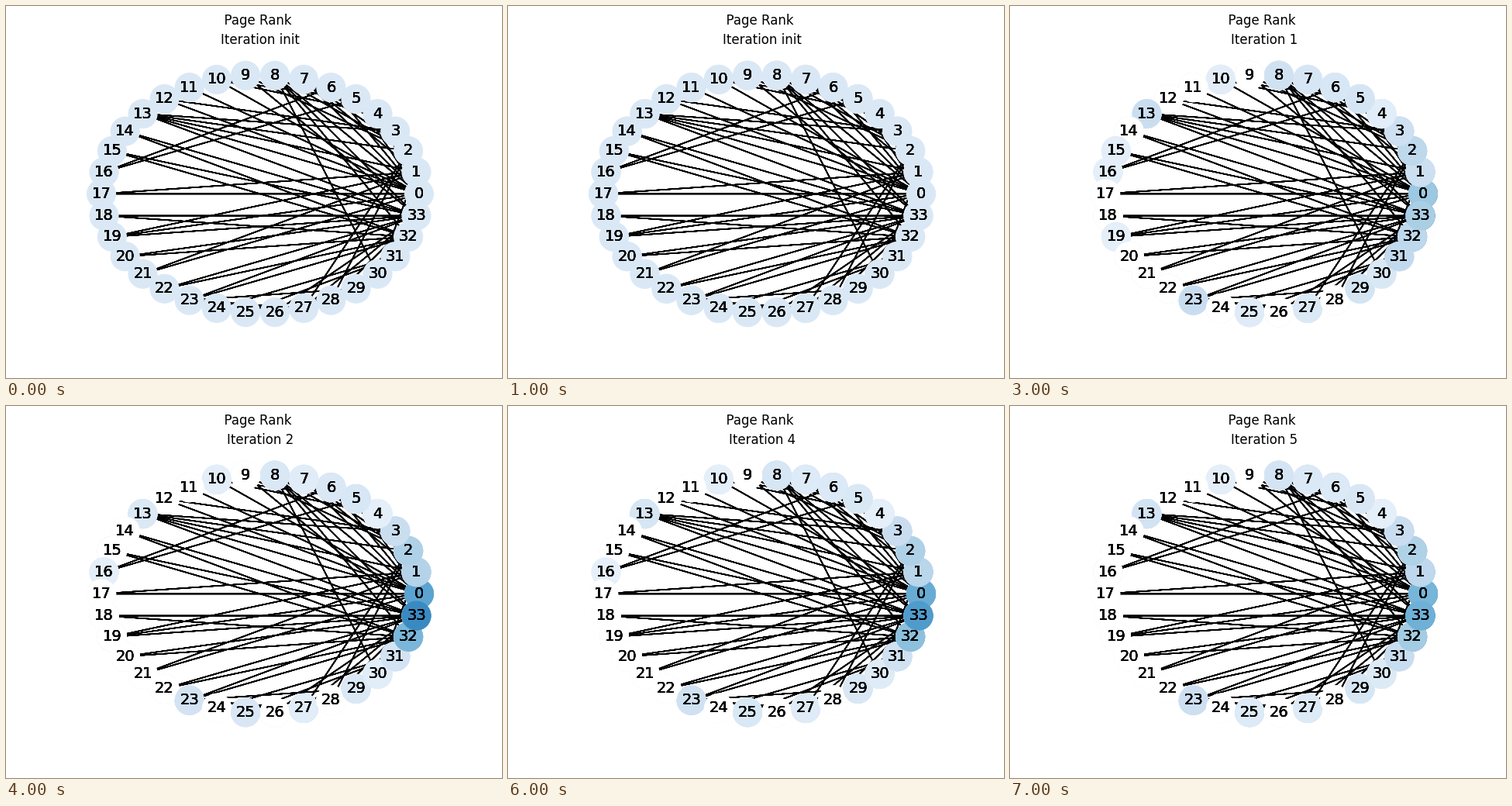
Recreate the animation shown at these times as a matplotlib script. Size 640x480 px, loop 8 s.

```python
from itertools import combinations, product

import matplotlib.pyplot as plt
import numpy as np
from matplotlib.animation import FuncAnimation
from matplotlib.collections import LineCollection

W, H = 640, 480
N = 34
FRAMES = 8
VMAX = 0.2
FAINT = 0.085  # paler shades than this show as white


def build_links():
    """Karate club ties, grouped into cliques and hub-to-member links."""
    links = np.zeros((N, N))

    def join(pairs, weight):
        for a, b in pairs:
            links[a, b] = links[b, a] = weight

    def hub(hubs, members, weight):
        join(product(hubs, members), weight)

    core, pair, rivals = range(4), (0, 1), (32, 33)
    join(combinations(core, 2), 4)
    join(combinations((5, 6, 16), 2), 3.4)
    hub(core, (7, 13), 3.3)
    hub(pair, (17, 19, 21), 2)
    hub([0], (4, 5, 6, 11), 3)
    hub([0], (8, 10, 12, 31), 2)
    hub(rivals, (14, 18, 20, 22), 2.3)
    hub(rivals, (8, 15, 30), 3.2)
    hub(rivals, (23, 29, 31), 4)
    hub([33], (9, 19, 26, 28), 2)
    hub([33], (13, 27, 32), 4)
    hub([2], (9, 27, 28, 32), 2)
    hub([8], (2, 30), 4)
    hub([10], (4, 5), 3)
    hub([23], (25, 27, 29), 4)
    hub([24], (25, 27, 31), 2.3)
    join([(1, 30), (4, 6), (28, 31)], 2)
    join([(3, 12), (26, 29)], 3.5)
    join([(25, 31)], 7)
    return links


def rank_history(links):
    """Rank vectors per frame: two starting states, then power iteration."""
    step = links / links.sum(axis=0)
    ranks = [np.full(N, 1 / N)] * 2
    while len(ranks) < FRAMES:
        ranks.append(step @ ranks[-1])
    return ranks


def shades(rank):
    level = rank / VMAX
    colors = plt.cm.Blues(level)
    colors[level < FAINT] = 1
    return colors


links = build_links()
angle = 2 * np.pi * np.arange(N) / N
pos = np.column_stack([np.cos(angle), np.sin(angle)])
xmax, ymax = 1.21 * pos.max(axis=0)

fig, ax = plt.subplots(figsize=(W / 100, H / 100), dpi=100)
fig.subplots_adjust(left=0.125, right=0.9, bottom=0.11, top=0.88)
ax.set(xlim=(-xmax, xmax), ylim=(-ymax, ymax))
ax.axis("off")

# Repeated strokes firm up the antialiased lines and digits
segments = [pos[[a, b]] for a, b in np.argwhere(np.triu(links))]
edges = LineCollection(segments * 10, colors="black", linewidths=1, zorder=1)
edges.set_snap(False)
ax.add_collection(edges, autolim=False)
layers = [ax.scatter(*pos.T, s=700, c=shades(rank), linewidths=1,
                     edgecolors="face", zorder=2)
          for rank in rank_history(links)]
for node, (x, y) in enumerate(pos):
    for _ in range(6):
        ax.text(x, y, str(node), fontsize=14, ha="center", va="center",
                zorder=3)

fig.suptitle("  Page Rank", fontsize=12)
caption = ax.set_title("", fontsize=12)


def update(frame):
    # Each step paints its discs over the earlier ones
    for i, layer in enumerate(layers):
        layer.set_visible(i <= frame)
    caption.set_text(f"Iteration {'init' if frame < 2 else frame - 2}")
    return [*layers, caption]


anim = FuncAnimation(fig, update, frames=FRAMES, interval=1000, repeat=True,
                     repeat_delay=0, blit=False)
plt.show()
```
